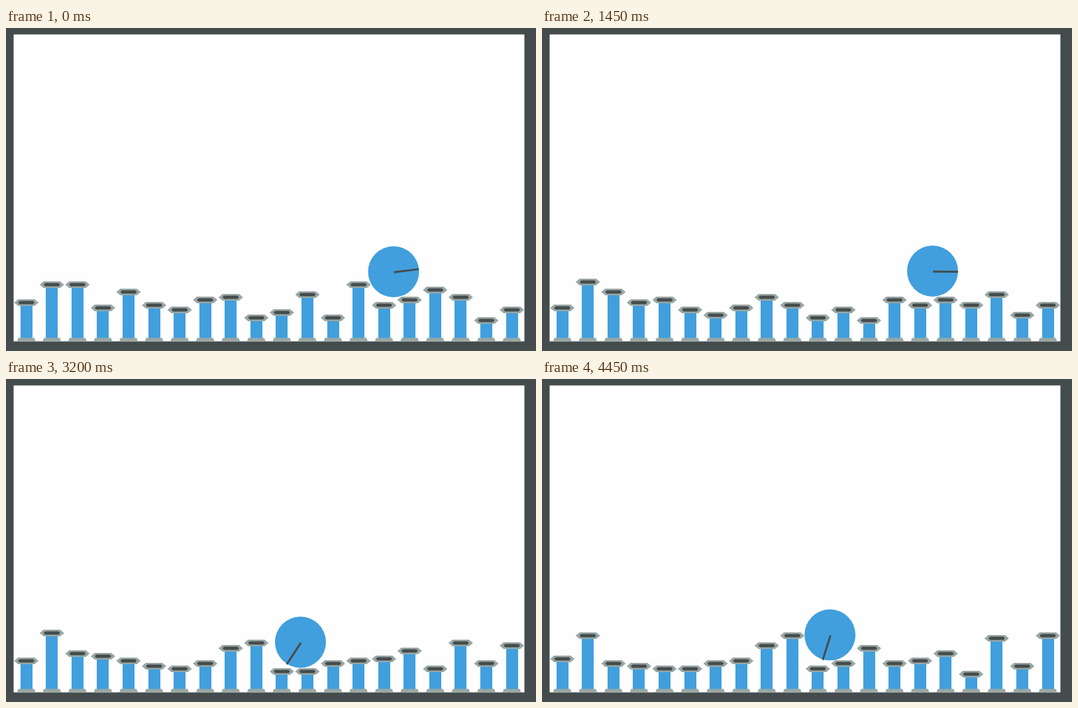
Animation, 800 px wide and 487 px high, one loop 4500 ms. Source, as an HTML page with a canvas:

```html
<!DOCTYPE html>
<html>
<head>
<meta charset="utf-8">
<style>
  html, body { margin: 0; width: 100%; height: 100%; overflow: hidden; background: #444c4d; }
  canvas { display: block; }
</style>
</head>
<body>
<canvas id="stage" width="800" height="487"></canvas>
<script>
const ctx = document.getElementById('stage').getContext('2d');
const LOOP = 4500, TICK = 50, RADIUS = 38.5;
const DARK = '#444c4d', GREY = '#9aa7a4', BLUE = '#419fdd';

// Three key poses: time, then the level of each piston
const poses = [
  [0,    [8, 15, 15, 6, 12, 7, 5, 9, 10, 2, 4, 11, 2, 15, 7, 9, 13, 10, 1, 5]],
  [2500, [4, 16, 10, 10, 6, 3, 1, 3, 10, 11, 1, 0, 0, 5, 7, 9, 3, 11, 5, 8]],
  [4450, [6, 15, 4, 3, 2, 2, 4, 5, 11, 15, 2, 4, 10, 4, 5, 8, 0, 14, 3, 15]]
];

// Ball: time, [x]
const path = [
  [0, [585]], [950, [576.5]], [1950, [602.5]], [2500, [460.5]],
  [3200, [444.5]], [3750, [434.7]], [4450, [434.7]]
];

const linear = k => k;
const smooth = k => k * k * (3 - 2 * k);

function sample(keys, t, ease) {
  let i = 0;
  while (i < keys.length - 2 && t >= keys[i + 1][0]) i++;
  const [t0, a] = keys[i], [t1, b] = keys[i + 1];
  const k = ease((t - t0) / (t1 - t0));
  return a.map((v, j) => v + (b[j] - v) * k);
}

const pistonAt = (level, i) => ({
  x: 30.7 + i * 38.57,
  y: 445.2 - Math.round(level) * 3.857
});

// The ball lies on the highest piston edge below it
function restHeight(x, pistons) {
  return Math.min(...pistons.map(p => {
    const gap = Math.max(0, Math.abs(x - p.x) - 13.5);
    return gap < RADIUS ? p.y - 6 - Math.sqrt(RADIUS ** 2 - gap ** 2) : Infinity;
  }));
}

function poly(color, ...points) {
  ctx.fillStyle = color;
  ctx.beginPath();
  points.forEach(([x, y]) => ctx.lineTo(x, y));
  ctx.fill();
}

function hexagon(color, x, y, w, h, bevel) {
  poly(color, [x - w, y], [x - w + bevel, y - h], [x + w - bevel, y - h],
    [x + w, y], [x + w - bevel, y + h], [x - w + bevel, y + h]);
}

function drawPiston({ x, y }) {
  const cap = Math.round(y - 0.5);
  ctx.fillStyle = BLUE;
  ctx.fillRect(Math.round(x - 9), cap, 18, 468 - cap);
  poly(GREY, [x - 14, 472.5], [x - 12, 467.3], [x + 12, 467.3], [x + 14, 472.5]);
  hexagon(GREY, x, cap, 18.5, 5, 6);
  hexagon(DARK, x, cap, 12.5, 2.5, 2.5);
}

function drawBall(x, y) {
  const a = (1.64 * (x - 585) - 7) * Math.PI / 180;
  ctx.fillStyle = BLUE;
  ctx.beginPath();
  ctx.arc(x, y, RADIUS, 0, 2 * Math.PI);
  ctx.fill();
  ctx.strokeStyle = DARK;
  ctx.lineWidth = 3;
  ctx.beginPath();
  ctx.moveTo(x + 0.7, y + 0.8);
  ctx.lineTo(x + RADIUS * Math.cos(a), y + 0.8 + RADIUS * Math.sin(a));
  ctx.stroke();
}

function frame(now) {
  const t = Math.floor((now % LOOP) / TICK) * TICK;
  const pistons = sample(poses, t, linear).map(pistonAt);
  const [x] = sample(path, t, smooth);
  ctx.fillStyle = DARK;
  ctx.fillRect(0, 0, 800, 487);
  ctx.fillStyle = '#fefefe';
  ctx.fillRect(11.5, 9.7, 771, 462.8);
  pistons.forEach(drawPiston);
  drawBall(x, restHeight(x, pistons));
  requestAnimationFrame(frame);
}
requestAnimationFrame(frame);
</script>
</body>
</html>
```
